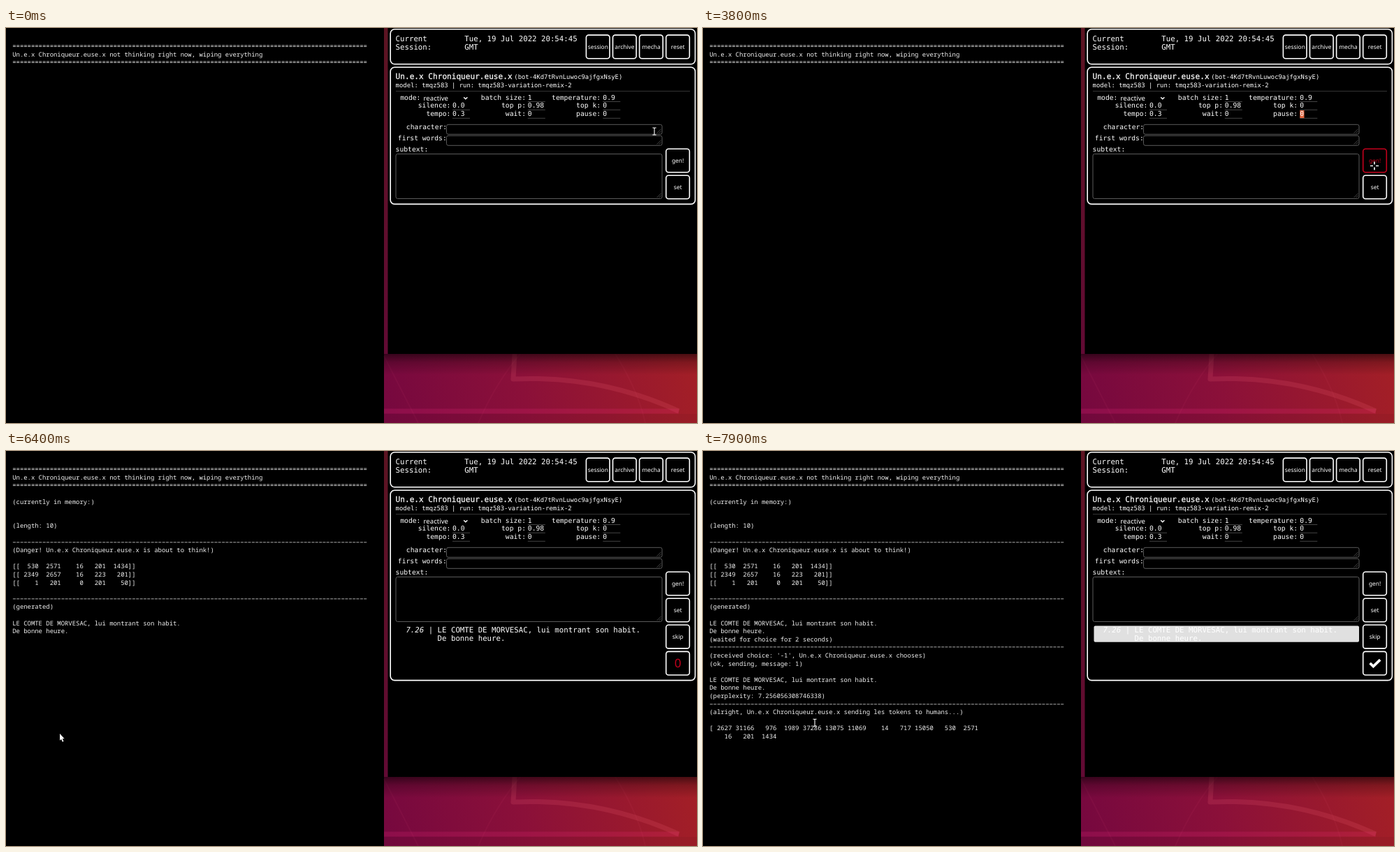
An HTML page for the animation above (8000 ms loop, 989 by 566 pixels).

```html
<!DOCTYPE html>
<html lang="en">
<head>
<meta charset="utf-8">
<title>Session</title>
<style>
  html, body { margin: 0; width: 100%; height: 100%; overflow: hidden; background: #000; }
  svg { display: block; width: 989px; height: 566px; }
  text { white-space: pre; text-rendering: geometricPrecision; fill: #fff; }
  .log { font: 8.92px "Noto Sans Mono", monospace; fill: #f2f2f2; }
  .mono { font-family: "DejaVu Sans Mono", monospace; }
  .sans { font-family: "Noto Sans", sans-serif; }
</style>
</head>
<body>
<svg id="stage" viewBox="0 0 989 566" xmlns="http://www.w3.org/2000/svg">
  <defs>
    <linearGradient id="wall" gradientUnits="userSpaceOnUse" x1="541" y1="566" x2="989" y2="480">
      <stop offset="0" stop-color="#76083f"/>
      <stop offset=".45" stop-color="#8b1039"/>
      <stop offset="1" stop-color="#a31f26"/>
    </linearGradient>
    <linearGradient id="edge" x1="0" y1="0" x2="0" y2="1">
      <stop offset="0" stop-color="#5c1422"/>
      <stop offset="1" stop-color="#620a34"/>
    </linearGradient>
    <linearGradient id="shade" x1="0" y1="0" x2="0" y2="1">
      <stop offset="0" stop-color="#000" stop-opacity=".55"/>
      <stop offset=".4" stop-color="#000" stop-opacity=".22"/>
      <stop offset="1" stop-color="#000" stop-opacity="0"/>
    </linearGradient>
  </defs>
  <rect x="541" width="448" height="566" fill="url(#wall)"/>
  <g fill="none" stroke="#ff6a80">
    <path d="M728 467L726 503Q850 497 963 549" stroke-width="7" stroke-opacity=".15" stroke-linejoin="round"/>
    <path d="M541 549H963" stroke="#ff2f8a" stroke-width="7" stroke-opacity=".16"/>
    <path d="M676 566Q700 510 736 467M541 470L590 566M872 467Q905 520 915 566" stroke-width="2" stroke-opacity=".05"/>
  </g>
  <rect x="541" y="553" width="448" height="13" fill="#000" opacity=".05"/>
  <rect x="541" width="6" height="467" fill="url(#edge)"/>
  <rect x="541" y="467" width="448" height="30" fill="url(#shade)"/>
  <rect x="546.5" width="443" height="467"/>
  <g id="log"></g>
  <g id="ui"></g>
  <g id="pointer"></g>
</svg>
<script>
const NS = 'http://www.w3.org/2000/svg';
const LOOP = 8000;
const WHITE = '#fff', RED = '#c4001c', ORANGE = '#eb9b70';
const NAME = 'Un.e.x Chroniqueur.euse.x';
const MODEL = 'tmqz583';
const LINE1 = 'LE COMTE DE MORVESAC, lui montrant son habit.';
const LINE2 = 'De bonne heure.';
const logBox = document.getElementById('log');
const ui = document.getElementById('ui');
const pointer = document.getElementById('pointer');

function add(parent, tag, attrs, content) {
  const el = document.createElementNS(NS, tag);
  for (const k in attrs) el.setAttribute(k, attrs[k]);
  if (content !== undefined) el.textContent = content;
  parent.append(el);
  return el;
}

function show(el, on) {
  el.setAttribute('display', on ? 'inline' : 'none');
}

function mono(x, y, size, content, anchor = 'start', parent = ui) {
  return add(parent, 'text', { x, y, class: 'mono', 'font-size': size, 'text-anchor': anchor }, content);
}

function frame(x, y, width, height, rx, stroke, w, parent = ui) {
  return add(parent, 'rect', { x, y, width, height, rx, stroke, 'stroke-width': w, fill: 'none' });
}

// Terminal log: [row, time it appears, text]
const DOUBLE = '='.repeat(95), SINGLE = '\u2212'.repeat(95);
const logLines = [
  [0, 0, DOUBLE],
  [1, 0, NAME + ' not thinking right now, wiping everything'],
  [2, 0, DOUBLE],
  [4, 5100, '(currently in memory:)'],
  [7, 5300, '(length: 10)'],
  [9, 5500, SINGLE],
  [10, 5500, `(Danger! ${NAME} is about to think!)`],
  [12, 5600, '[[  530  2571    16   201  1434]]'],
  [13, 5600, '[[ 2349  2657    16   223   201]]'],
  [14, 5600, '[[    1   201     0   201    50]]'],
  [16, 5800, SINGLE],
  [17, 5800, '(generated)'],
  [19, 5800, LINE1],
  [20, 5800, LINE2],
  [21, 6700, '(waited for choice for 2 seconds)'],
  [22, 6700, SINGLE],
  [23, 6700, `(received choice: '-1', ${NAME} chooses)`],
  [24, 7300, '(ok, sending, message: 1)'],
  [26, 7400, LINE1],
  [27, 7400, LINE2],
  [28, 7400, '(perplexity: 7.256056308746338)'],
  [29, 7500, SINGLE],
  [30, 7500, `(alright, ${NAME} sending les tokens to humans...)`],
  [32, 7600, '[ 2627 31166   976  1989 37286 13075 11069    14   717 15050   530  2571'],
  [33, 7600, '    16   201  1434']
].map(([row, at, content]) => ({
  at,
  el: add(logBox, 'text', { x: 9.2, y: 29.2 + 11.6 * row, class: 'log' }, content)
}));

// Control panel
frame(550.2, 1.7, 436.2, 50, 6, WHITE, 1.6);
const panel = frame(550.2, 56.2, 436.2, 196.2, 6, WHITE, 1.6);
mono(557.6, 19, 10.72, 'Current');
mono(557.6, 31, 10.72, 'Session:');
mono(656.3, 19, 10.72, 'Tue, 19 Jul 2022 20:54:45');
mono(656.3, 31, 10.72, 'GMT');
const title = mono(557.6, 73.4, 11.1, NAME);
title.setAttribute('stroke', WHITE);
title.setAttribute('stroke-width', .25);
mono(727.3, 73.2, 8.9, '(bot-4Kd7tRvnLuwoc9ajfgxNsyE)');
mono(557.6, 84.6, 8.92, `model: ${MODEL} | run: ${MODEL}-variation-remix-2`);
add(ui, 'path', { d: 'M558 90.5H979', stroke: '#333', 'stroke-width': 1 });

const ROWS = [102.6, 114.4, 126.4];
const COLS = [
  [636.4, 639, [null, ['silence:', '0.0'], ['tempo:', '0.3']]],
  [744, 746.8, [['batch size:', '1'], ['top p:', '0.98'], ['wait:', '0']]],
  [851.1, 854.3, [['temperature:', '0.9'], ['top k:', '0'], ['pause:', '']]]
];
for (const [end, start, fields] of COLS) {
  fields.forEach((field, i) => {
    if (!field) return;
    mono(end, ROWS[i], 9.7, field[0], 'end');
    mono(start, ROWS[i], 9.7, field[1]);
    add(ui, 'path', { d: `M${start} ${ROWS[i] + 2.9}h25`, stroke: '#444', 'stroke-width': 1 });
  });
}
const mark = add(ui, 'rect', { x: 854.3, y: 118, width: 6.2, height: 11, fill: '#e4663f' });
mono(854.3, ROWS[2], 9.7, '0');
const caret = add(ui, 'path', { d: 'M860.8 118.5V128.5', stroke: WHITE, 'stroke-width': 1 });

mono(593.4, 102.6, 9.7, 'mode:', 'end');
add(ui, 'text', { x: 597.6, y: 104, class: 'sans', 'font-size': 9.6 }, 'reactive');
add(ui, 'path', { d: 'M655.2 99.2L657.8 101.8L660.4 99.2', stroke: WHITE, 'stroke-width': 1.4, fill: 'none' });
mono(631.2, 145, 9.7, 'character:', 'end');
mono(630.8, 161, 9.7, 'first words:', 'end');
mono(557.6, 177, 9.7, 'subtext:');

function textArea(x, y, w, h) {
  frame(x, y, w, h, 2.5, '#5a5a5a', 1);
  const r = x + w - 1.5, b = y + h - 1.5;
  add(ui, 'path', { d: `M${r - 6} ${b}L${r} ${b - 6}M${r - 3} ${b}L${r} ${b - 3}`, stroke: '#555', 'stroke-width': .8 });
}
textArea(630.5, 138.3, 308.5, 14);
textArea(630.5, 154.3, 308.5, 14);
textArea(558, 180.5, 381, 64);

// Message that appears with the two extra buttons
const reply = add(ui, 'g', {});
const glow = add(reply, 'rect', { x: 559.5, y: 250.5, width: 379.5, height: 23.3, rx: 2, fill: WHITE });
const first = mono(572.4, 260.3, 10.72, '', 'start', reply);
add(first, 'tspan', { 'font-style': 'italic' }, '7.26');
add(first, 'tspan', {}, ' | ' + LINE1);
mono(617.6, 271.8, 10.72, LINE2, 'start', reply);

function button(x, y, label, parent = ui) {
  const box = frame(x, y, 33.6, 33.6, 3.5, WHITE, 1.6, parent);
  const word = add(parent, 'text', {
    x: x + 16.9, y: y + 20, class: 'sans', 'font-size': 8.35, 'text-anchor': 'middle'
  }, label);
  return color => {
    box.setAttribute('stroke', color);
    word.style.fill = color;
  };
}
['session', 'archive', 'mecha', 'reset'].forEach((label, i) => button(830.4 + 38.1 * i, 10.1, label));
const tintGen = button(944.7, 173.2, 'gen!');
const tintSet = button(944.7, 211.2, 'set');
button(944.7, 249.3, 'skip', reply);
button(944.7, 287.4, '', reply);
const count = add(reply, 'text', { x: 961.5, y: 310, class: 'sans', 'font-size': 17, 'text-anchor': 'middle' }, '0');
count.style.fill = RED;
const check = add(reply, 'path', { d: 'M954.6 304L959.4 308.6L969.2 299.2', stroke: WHITE, 'stroke-width': 3.7, fill: 'none' });

// Pointer shapes
const CROSS = 'M-6 0H-2M2 0H6M0 -6V-2M0 2V6';
const shapes = { beam: add(pointer, 'g', {}), arrow: add(pointer, 'g', {}), cross: add(pointer, 'g', {}) };
add(shapes.beam, 'path', {
  d: 'M-2.6 -5H-.7L0 -4.4L.7 -5H2.6M0 -4.4V4.4M-2.6 5H-.7L0 4.4L.7 5H2.6',
  stroke: WHITE, 'stroke-width': 1.1, fill: 'none'
});
add(shapes.arrow, 'path', {
  d: 'M0 0V9.8L2.1 7.9L3.8 11.8L5.5 11.1L3.8 7.3H6.6Z',
  fill: WHITE, stroke: '#000', 'stroke-width': .6, 'paint-order': 'stroke'
});
add(shapes.cross, 'path', { d: CROSS, stroke: '#000', 'stroke-width': 2.8 });
add(shapes.cross, 'path', { d: CROSS, stroke: WHITE, 'stroke-width': 1.6 });

// Pointer moves: [start, steps of 100 ms, shape, end x, end y]
const moves = [
  [0, 1, 'beam', 928, 148],
  [1100, 1, 'beam', 892.5, 126],
  [1400, 1, 'beam', 892, 126],
  [1600, 3, 'beam', 873, 127],
  [1900, 2, 'beam', 869, 123.5],
  [2300, 1, 'beam', 868.5, 122.8],
  [2500, 3, 'beam', 844, 123],
  [3000, 1, 'beam', 841.5, 123],
  [3100, 1, 'arrow', 900, 195],
  [3200, 1, 'arrow', 951.5, 263.5],
  [3400, 1, 'arrow', 957, 249],
  [3500, 2, 'cross', 961, 197.5],
  [5600, 1, 'beam', 755, 212],
  [5700, 1, 'arrow', 549.7, 215.7],
  [5800, 2, 'arrow', 269, 342],
  [6100, 2, 'arrow', 150, 418],
  [6300, 2, 'arrow', 77, 405],
  [6600, 6, 'arrow', 180.5, 361.7],
  [7300, 3, 'arrow', 172, 377],
  [7600, 4, 'beam', 160, 389.3]
];

function pointerAt(t) {
  let i = moves.length - 1;
  while (moves[i][0] > t) i--;
  const [start, steps, shape, x, y] = moves[i];
  const [, , , px, py] = moves[Math.max(0, i - 1)];
  const k = Math.min(1, (Math.floor((t - start) / 100) + 1) / steps);
  return { shape, x: px + (x - px) * k, y: py + (y - py) * k };
}

function genColor(t) {
  if (t < 3600 || t >= 5900) return WHITE;
  return t >= 3800 && t < 5600 ? RED : ORANGE;
}

function draw(t) {
  for (const line of logLines) show(line.el, t >= line.at);
  show(caret, t >= 2000 && t < 2600);
  show(mark, t >= 2600 && t < 5100);
  tintGen(genColor(t));
  tintSet(t >= 3500 && t < 3600 ? ORANGE : WHITE);

  show(reply, t >= 5600);
  panel.setAttribute('height', t >= 5600 ? 272.4 : 196.2);
  show(count, t < 6700);
  show(check, t >= 6700);
  const step = Math.floor((t - 7300) / 100);
  glow.setAttribute('opacity', .88 * Math.min(1, Math.max(0, step / 6)));

  const p = pointerAt(t);
  for (const name in shapes) show(shapes[name], name === p.shape);
  pointer.setAttribute('transform', `translate(${p.x} ${p.y})`);
}

const begin = performance.now();
function tick() {
  draw((performance.now() - begin) % LOOP);
  requestAnimationFrame(tick);
}
tick();
</script>
</body>
</html>
```
